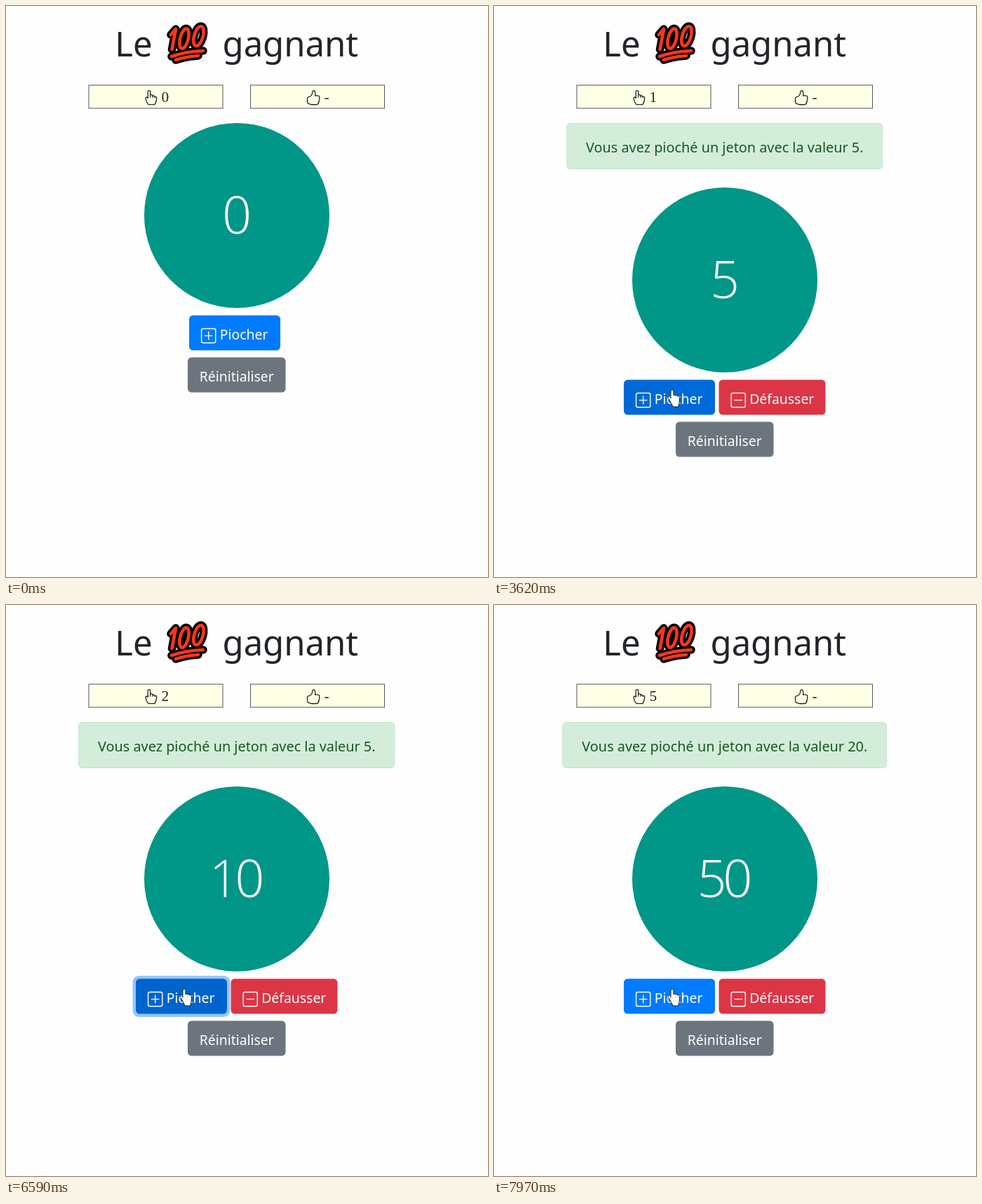
An HTML page that plays this animation: 687 px wide and 815 px high, repeating every 8 s.

```html
<!DOCTYPE html>
<html lang="fr">
<head>
<meta charset="utf-8">
<title>Le 100 gagnant</title>
<style>
  html, body { margin: 0; width: 100%; height: 100%; overflow: hidden; background: #fefefe; }
  svg { display: block; width: 687px; height: 815px; font: 19.4px "Noto Sans", "Open Sans", sans-serif; }
  .title { font-size: 49px; fill: #212529; }
  .box { fill: #ffffe5; stroke: #50555a; }
  .icon { fill: none; stroke: #212529; }
  .count { font: 21.3px "Liberation Serif", serif; fill: #212529; }
  .total { font: 300 73px "Open Sans", sans-serif; letter-spacing: -5px; fill: #fff; text-anchor: middle; }
  .alert { font-size: 19.85px; fill: #155724; text-anchor: middle; }
  .label { fill: #fff; }
  .symbol { fill: none; stroke: #fff; stroke-width: 1.4; }
  .cursor { fill: #fff; stroke: #111; stroke-width: .9; stroke-linejoin: round; }
</style>
</head>
<body>
<svg viewBox="0 0 687 815">
  <defs>
    <g id="hundred">
      <path d="M235 41L242 33 236.5 62M236 72Q256 65 281 64M242 77Q257 72 274 71"/>
      <ellipse cx="254" cy="46.5" rx="5.8" ry="14.5" transform="rotate(14 254 46.5)"/>
      <ellipse cx="274.5" cy="43" rx="6.3" ry="14.5" transform="rotate(16 274.5 43)"/>
    </g>
  </defs>
  <text class="title" x="155.3" y="72">Le</text>
  <text class="title" x="308.5" y="72">gagnant</text>
  <g fill="none" stroke-linecap="round" stroke-linejoin="round">
    <use href="#hundred" stroke="#000" stroke-width="11.5"/>
    <use href="#hundred" stroke="#f8371c" stroke-width="4.6"/>
  </g>
  <rect class="box" x="118" y="113" width="191" height="33"/>
  <rect class="box" x="348.5" y="113" width="191" height="33"/>
  <path class="icon" transform="translate(195 120) scale(1.33)" d="M5.5 9V1.75a1.25 1.25 0 0 1 2.5 0V8M8 5c1.6-.1 2.5 0 2.5 1v2M10.5 6c1.6-.1 1.9.2 2.5 1v1.5M13 7h.4a1.4 1.4 0 0 1 1.4 1.5l-.3 2.9a3 3 0 0 1-.4 1.2l-1.3 2.9H6L4 12.6a2 2 0 0 1-.3-.9L3.2 8.7q0-.8.8-1L5.5 7.5"/>
  <path class="icon" transform="translate(427.5 120) scale(1.33)" d="M9.9 6c.2-.9.4-2.5-.1-3.7C9.4 1 8.8.5 7.9.6 7 .8 7 1.5 6.9 2.5c-.1 1-.4 2.5-1.1 3.2C5 6.6 4 7.2 2.7 7.5 1.9 7.8 1.5 8 1.5 9v4c0 1 .5 1.5 1.3 1.6 1.5.2 1.8 1 3.7 1H11c1.5 0 2.5-.6 2.5-1.8q0-.5-.1-.8c.7-.4.9-1.2.6-2 .6-.6.7-1.4.3-2.2.4-.8.3-1.8-.4-2.4C13 5.8 11.5 5.8 9.9 6z"/>
  <text class="count" x="453.5" y="137">-</text>
  <g id="scene"></g>
</svg>
<script>
const LOOP = 8000, STEP = 76.5;
// Each draw: press time, steps until the page updates, token value
const draws = [
  { at: 1920, delay: 3, value: 5 },
  { at: 5580, delay: 3, value: 5 },
  { at: 6360, delay: 4, value: 10 },
  { at: 7050, delay: 4, value: 10 },
  { at: 7740, delay: 3, value: 20 },
];
const START = [492, 684], FIRST = [346, 475], SECOND = [254, 548];
const ARROW = "M0 0V17L4 13.5 6.8 20 9.5 18.8 6.8 12.5H12Z";
const HAND = "M-2 2a2 2 0 0 1 4 0v6c.4-1.5 2.9-1.3 3 .4 .5-1.2 2.8-.9 2.9.8 .5-1 2.4-.6 2.4 1.4v5c0 3-1.3 4.6-1.5 8.4h-8c-.4-2.8-2.6-5-4-8.4-1.4-2.6-2.5-4-2.5-5.2 0-1.8 1.9-2 2.9.2l.8 1.4z";
const scene = document.getElementById("scene");

const stepsSince = (t, at) => Math.floor((t - at) / STEP);
const clamp = p => Math.min(1, Math.max(0, p));
const ease = p => p * p * (3 - 2 * p);
const travel = (a, b, p) => a.map((v, i) => v + (b[i] - v) * ease(clamp(p)));

function cursorAt(t) {
  if (t < 670) return null;
  return t < 3160
    ? travel(START, FIRST, stepsSince(t, 670) / 10)
    : travel(FIRST, SECOND, (stepsSince(t, 3160) + 1) / 7);
}

function button(x, y, w, color, label, sign, ring = 0) {
  const symbol = sign && `<rect class="symbol" x="17.6" y="18.5" width="20.2" height="20.2" rx="2.5"/>
    <path class="symbol" stroke-linecap="round" d="M22.4 28.6h10.6${sign === "+" ? "M27.7 23.3v10.6" : ""}"/>`;
  return `<g transform="translate(${x} ${y})">
    <rect x="-4.4" y="-4.8" width="${w + 8.8}" height="58.7" rx="9" fill="#268fff" opacity="${ring / 2}"/>
    <rect y="-.4" width="${w}" height="49.9" rx="5.5" fill="${color}"/>${symbol}
    <text class="label" x="${sign ? 43.7 : 16.7}" y="33.5">${label}</text></g>`;
}

function render(t) {
  const done = draws.filter(d => stepsSince(t, d.at) >= d.delay);
  const last = done[done.length - 1];
  const pressed = draws.find(d => t >= d.at && stepsSince(t, d.at) < d.delay);
  const press = pressed ? stepsSince(t, pressed.at) : -1;
  const total = done.reduce((sum, d) => sum + d.value, 0);
  const shift = last ? 92 : 0, left = last ? 185 : 261;
  const cursor = cursorAt(t);
  const over = (x, y, w) => cursor && cursor[0] >= x && cursor[0] <= x + w &&
    cursor[1] >= y && cursor[1] <= y + 49.5;
  const overDraw = over(left, 442 + shift, 130), overReset = over(259, 502 + shift, 139.5);

  // A freshly rebuilt button fades into its hover colour
  const fade = last ? clamp((stepsSince(t, last.at) - last.delay) / 2) : 1;
  const dark = press > 0 ? 1.3 : overDraw ? fade : 0;
  const blue = `rgb(0,${123 - 18 * dark},${255 - 38 * dark})`;

  let out = `<text class="count" x="221.5" y="137">${done.length}</text>`;
  if (last) {
    const w = last.value > 9 ? 462 : 450;
    out += `<rect x="${328.7 - w / 2}" y="167.5" width="${w}" height="65" rx="5" fill="#d4edda" stroke="#c3e6cb"/>
      <text class="alert" x="328.8" y="209.4">Vous avez pioché un jeton avec la valeur ${last.value}.</text>`;
  }
  out += `<circle cx="329" cy="${299 + shift}" r="132" fill="#009688"/>
    <text class="total" x="326.5" y="${325.4 + shift}">${total}</text>`;
  out += button(left, 442 + shift, 130, blue, "Piocher", "+", clamp(press / 2));
  if (last) out += button(320.5, 534, 152, "#dc3545", "Défausser", "-");
  out += button(259, 502 + shift, 139.5, overReset ? "#5a6268" : "#6c757d", "Réinitialiser", "");
  if (cursor) {
    out += `<path class="cursor" transform="translate(${cursor})" d="${overDraw || overReset ? HAND : ARROW}"/>`;
    if (press >= 0) out += `<circle cx="${cursor[0]}" cy="${cursor[1]}" r="16" fill="#ff0" opacity="${[.45, .4, .2, 0][press]}"/>`;
  }
  return out;
}

let shown = "";
function tick() {
  const next = render(performance.now() % LOOP);
  if (next !== shown) scene.innerHTML = shown = next;
  requestAnimationFrame(tick);
}
tick();
</script>
</body>
</html>
```
